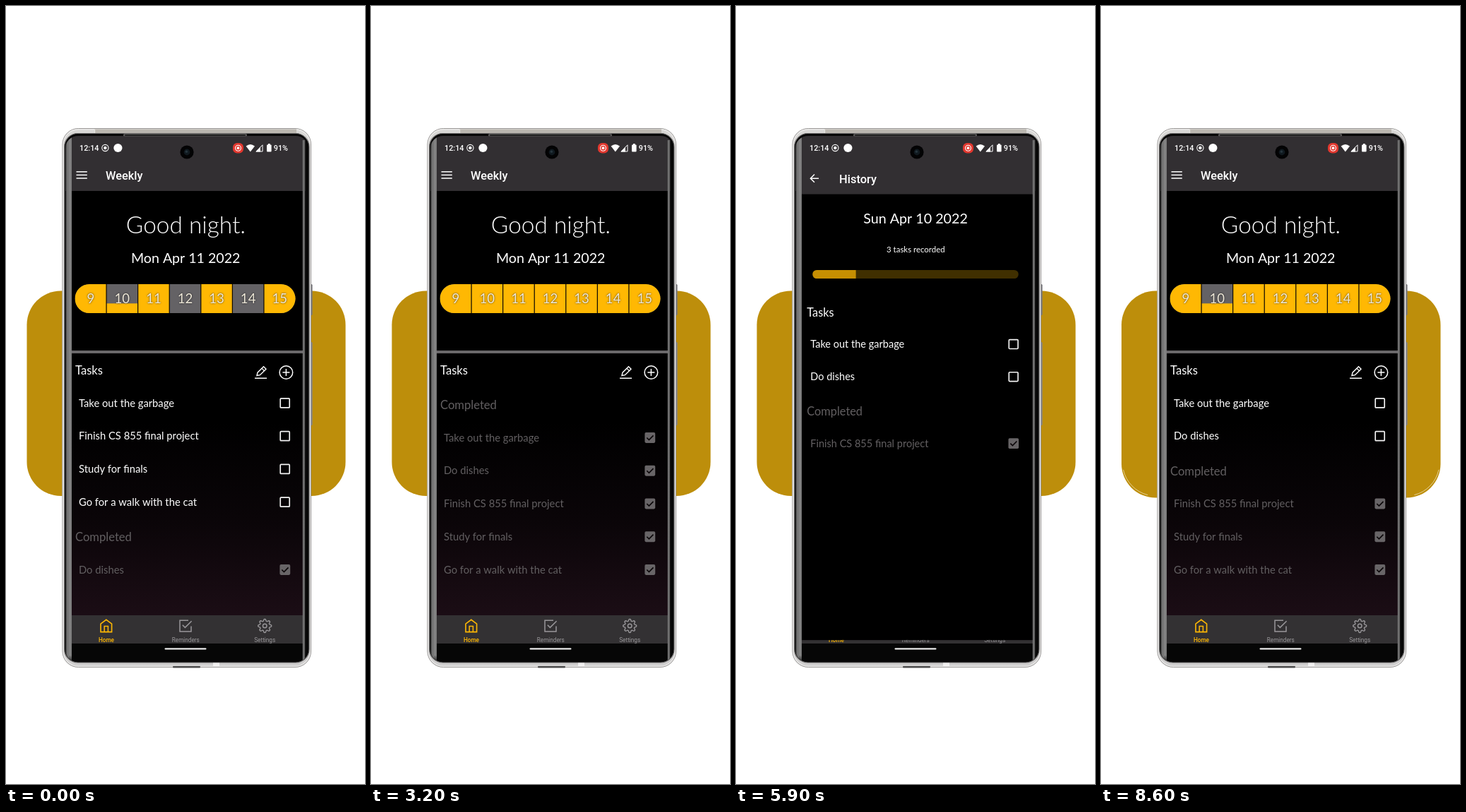
These frames come from a looping animation (508x1102 px, 9900 ms). An HTML page with a canvas:

```html
<!DOCTYPE html>
<html lang="en">
<head>
<meta charset="utf-8">
<title>Weekly tasks</title>
<style>
html, body { margin: 0; width: 100%; height: 100%; overflow: hidden; background: #fff; }
canvas { display: block; width: 100%; height: 100%; }
</style>
</head>
<body>
<canvas id="stage"></canvas>
<script>
const W = 508, H = 1102, LOOP = 9900, STEP = 100;
const GOLD = '#ffb803', GREY = '#646265', BAR = '#322f32', FADED = '#625f61';
const BODY = 'Lato, sans-serif', UI = 'Roboto, sans-serif';
const canvas = document.getElementById('stage');
const c = canvas.getContext('2d');
const dpr = window.devicePixelRatio || 1;
canvas.width = W * dpr;
canvas.height = H * dpr;

const TASKS = ['Take out the garbage', 'Do dishes', 'Finish CS 855 final project',
  'Study for finals', 'Go for a walk with the cat'];
// Moments at which a task is ticked or unticked
const TOGGLES = [[200, 4], [1100, 3], [1900, 2], [3100, 0], [4100, 0], [4900, 1]];

const clamp = v => Math.max(0, Math.min(1, v));

function rect(x, y, w, h, fill) {
  c.fillStyle = fill;
  c.fillRect(x, y, w, h);
}

function round(x, y, w, h, r, fill, stroke, lw = 1) {
  c.beginPath();
  c.roundRect(x, y, w, h, r);
  if (fill) { c.fillStyle = fill; c.fill(); }
  if (stroke) { c.strokeStyle = stroke; c.lineWidth = lw; c.stroke(); }
}

function disc(x, y, r, fill, stroke, lw = 1) {
  round(x - r, y - r, 2 * r, 2 * r, r, fill, stroke, lw);
}

function line(points, color, lw, closed) {
  c.beginPath();
  points.forEach(([x, y], i) => i ? c.lineTo(x, y) : c.moveTo(x, y));
  if (closed) c.closePath();
  c.strokeStyle = color;
  c.lineWidth = lw;
  c.stroke();
}

function poly(points, fill) {
  c.beginPath();
  points.forEach(([x, y]) => c.lineTo(x, y));
  c.fillStyle = fill;
  c.fill();
}

// y is the middle of the capitals
function text(s, x, y, size, { color = '#fff', font = BODY, weight = 400, align = 'left' } = {}) {
  c.font = `${weight} ${size}px ${font}`;
  c.textAlign = align;
  c.fillStyle = color;
  c.fillText(s, x, y + size * 0.36);
}

function gradient(x0, y0, x1, y1, colors) {
  const g = c.createLinearGradient(x0, y0, x1, y1);
  colors.forEach((color, i) => g.addColorStop(i / (colors.length - 1), color));
  return g;
}

const vertical = (y0, y1, ...colors) => gradient(0, y0, 0, y1, colors);
const horizontal = (x0, x1, ...colors) => gradient(x0, 0, x1, 0, colors);

function doneAt(t) {
  const done = [false, true, false, false, false];
  for (const [at, i] of TOGGLES) if (t >= at) done[i] = !done[i];
  return done;
}

function checkbox(y, checked) {
  if (!checked) return round(388.2, y - 6.4, 13, 13, 1, null, '#f2f2f2', 1.7);
  round(387.4, y - 7.2, 14.8, 14.8, 1.8, '#686567');
  line([[390.3, y + 0.2], [393.4, y + 3.3], [399.5, y - 3]], '#0c080a', 1.7);
}

function taskRow(name, y, checked) {
  text(name, 103, y, 14.75, { color: checked ? FADED : '#fff' });
  checkbox(y, checked);
}

function taskList(done, indexes, top, headGap) {
  const open = indexes.filter(i => !done[i]), closed = indexes.filter(i => done[i]);
  const pitch = 46.75;
  open.forEach((i, n) => taskRow(TASKS[i], top + n * pitch, false));
  const head = top + open.length * pitch + headGap;
  text('Completed', 98, head, 16.6, { color: FADED });
  closed.forEach((i, n) => taskRow(TASKS[i], head + 46 + n * pitch, true));
}

function week(done) {
  const x0 = 97.5, y0 = 394, w = 312, h = 41, cell = w / 7;
  const share = [0, 1, 2].filter(i => done[i]).length / 3;
  const fill = [1, share, 1, +done[3], 1, +done[4], 1];
  c.save();
  c.beginPath();
  c.roundRect(x0, y0, w, h, 20.5);
  c.clip();
  fill.forEach((f, i) => {
    const x = x0 + i * cell;
    rect(x, y0, cell + 0.5, h, GREY);
    rect(x, y0 + h * (1 - f), cell + 0.5, h * f, GOLD);
  });
  for (let i = 1; i < 7; i++) rect(x0 + i * cell - 0.6, y0, 1.2, h, '#0b0800');
  c.restore();
  c.save();
  c.shadowColor = 'rgba(0,0,0,.75)';
  c.shadowBlur = 2.5 * dpr;
  fill.forEach((f, i) => text(String(9 + i), x0 + (i + 0.5) * cell, 414, 18.6,
    { color: '#eee8d8', align: 'center' }));
  c.restore();
}

function listIcons() {
  line([[352, 527.3], [369, 527.3]], '#fff', 1.5);
  line([[355, 523.5], [356, 519.2], [364.5, 510.8], [368, 514.2], [359.4, 522.7]], '#fff', 1.4, true);
  line([[362, 513.4], [365.5, 516.8]], '#fff', 1.2);
  disc(396.4, 519, 9.3, null, '#fff', 1.5);
  line([[391.4, 519], [401.4, 519]], '#fff', 1.5);
  line([[396.4, 514], [396.4, 524]], '#fff', 1.5);
}

function tabs() {
  const grey = '#99979a';
  rect(89, 863, 334, 40, '#333133');
  line([[134, 875.2], [141.8, 869.3], [149.6, 875.2], [149.6, 886.6], [134, 886.6]], GOLD, 1.6, true);
  line([[139.2, 886.6], [139.2, 878.6], [144.4, 878.6], [144.4, 886.6]], GOLD, 1.5);
  line([[262, 878.5], [262, 886], [246, 886], [246, 870.2], [258, 870.2]], grey, 1.5);
  line([[249.8, 876.8], [253.4, 880.4], [262.6, 871.2]], grey, 1.5);
  const gear = [];
  for (let i = 0; i < 64; i++) {
    const a = i / 64 * 2 * Math.PI;
    const r = 8.2 + 1.3 * Math.tanh(2.2 * Math.cos(8 * a));
    gear.push([366.2 + r * Math.cos(a), 878 + r * Math.sin(a)]);
  }
  line(gear, grey, 1.4, true);
  disc(366.2, 878, 2.8, null, grey, 1.4);
  const label = (s, x, color, weight) =>
    text(s, x, 898.4, 8.2, { color, weight, font: UI, align: 'center' });
  label('Home', 142, GOLD, 500);
  label('Reminders', 254.3, grey, 400);
  label('Settings', 366.2, grey, 400);
}

function home(t) {
  const done = doneAt(t);
  rect(84, 262, 340, 641, '#000');
  rect(89, 590, 334, 273, vertical(590, 863, '#000', '#0a0508', '#1b0d15'));
  rect(84, 182, 340, 80, BAR);
  for (const y of [234.8, 239.4, 244]) rect(99.5, y - 0.75, 15.3, 1.5, '#fff');
  text('Weekly', 141, 240, 16.4, { font: UI, weight: 500 });
  text('Good night.', 254.5, 309.5, 33.4, { align: 'center', weight: 300 });
  text('Mon Apr 11 2022', 254.2, 357.4, 19.6, { align: 'center' });
  week(done);
  rect(89, 488, 334, 4, '#6a686a');
  text('Tasks', 98, 516.5, 16.6);
  listIcons();
  taskList(done, [0, 1, 2, 3, 4], 562.3, 3);
  tabs();
}

function history(t, p) {
  const age = t - 5800;
  const scale = 0.85 + 0.15 * p;
  const alpha = clamp(p / 0.75);
  c.save();
  c.globalAlpha = alpha;
  c.translate(255, 574);
  c.scale(scale, scale);
  c.translate(-255, -574);
  rect(84, 262, 340, 641, '#000');
  rect(84, 182, 340, 80, BAR);
  line([[115, 239.3], [103.4, 239.3]], '#fff', 1.5);
  line([[108.9, 233.6], [103.2, 239.3], [108.9, 245]], '#fff', 1.5);
  text('History', 144.5, 240, 16.7, { font: UI, weight: 500 });
  text('Sun Apr 10 2022', 254, 297, 20, { align: 'center' });
  text('3 tasks recorded', 254.3, 341.6, 11.6, { align: 'center' });
  const shown = (1 - Math.exp(-age / 100)) / 3;
  c.save();
  c.globalAlpha = alpha * (1 - Math.exp(-age / 83));
  c.beginPath();
  c.roundRect(106, 371, 296, 12.4, 6.2);
  c.clip();
  rect(106, 371, 296, 12.4, '#5c4300');
  rect(106, 371, 296 * shown, 12.4, GOLD);
  c.restore();
  text('Tasks', 98, 432, 16.6);
  taskList(doneAt(t), [0, 1, 2], 477.6, 3);
  c.restore();
}

function statusBar() {
  const label = (s, x) => text(s, x, 201, 10.8, { font: UI, weight: 500 });
  label('12:14', 104);
  disc(140.4, 201, 4.6, null, '#fff', 1.1);
  disc(140.4, 201, 2.2, '#fff');
  disc(158.4, 201, 6.1, '#fff');
  round(321, 194, 15, 14.6, 6, '#e2382f');
  disc(328.5, 201.2, 4, null, '#fff', 1.1);
  disc(328.5, 201.2, 1.9, '#fff');
  c.beginPath();
  c.moveTo(345.8, 206.5);
  c.lineTo(339.6, 198.6);
  c.quadraticCurveTo(345.8, 193.6, 352, 198.6);
  c.fillStyle = '#fff';
  c.fill();
  line([[354, 206], [363, 206], [363, 196.8]], '#fff', 1, true);
  poly([[353.2, 206.4], [360, 199.6], [360, 206.4]], '#fff');
  round(369, 196.4, 6.6, 10.2, 1, '#fff');
  rect(370.9, 195, 2.8, 2, '#fff');
  label('91%', 378.8);
  disc(256, 207, 9.6, '#030304');
  disc(256, 207, 4.4, '#10191f');
  disc(255.4, 206.2, 1.8, '#25343c');
}

function panel(t) {
  const color = '#bd8e0b';
  if (t < 6000) return round(29.5, 403.5, 451, 290.5, 48, color);
  round(29, 403.5, 451.5, 293, 48, color);
  c.strokeStyle = 'rgba(255,250,235,.75)';
  c.lineWidth = 0.8;
  for (const [x, from, to] of [[78, 0.58, 0.93], [431.5, 0.07, 0.42]]) {
    c.beginPath();
    c.arc(x, 646.5, 47.6, from * Math.PI, to * Math.PI);
    c.stroke();
  }
}

function shell() {
  round(430, 394, 3.6, 44, 1.5, '#77777c');
  round(430, 476, 3.6, 118, 1.5, '#85858a');
  round(79.5, 173, 352.5, 764, 23, vertical(173, 937, '#d9d8d6', '#c4c3c3', '#dcdbdb', '#cfcece'));
  round(80, 173.5, 351.5, 763, 22.5, null, '#989695', 1);
  round(81.1, 174.6, 349.3, 760.8, 21.5, null, '#efeeed', 1.2);
  rect(125, 174.5, 286, 5.5, '#bbb7b0');
  rect(125, 174.5, 1.2, 6, '#e6e4e0');
  round(82.6, 180.5, 346.4, 749.5, 19, '#060606', '#6c6b6b', 1.2);
  round(236, 935, 39, 2.4, 1, '#4a4a4a');
  rect(293, 930.5, 9, 5, '#f0efef');
}

// Light caught by the curved sides of the glass
function glare() {
  rect(84.5, 184, 4.6, 746, horizontal(84.5, 89.1, '#3c3c3c', '#787878', '#747474'));
  rect(89, 184, 4, 736, horizontal(89, 93, '#858585', '#7c7c7c'));
  rect(89, 920, 4, 10, vertical(920, 930, '#7c7c7c', '#1a1a1a'));
  rect(419.8, 190, 3.6, 740, horizontal(419.8, 423.4, '#7d7d7d', '#555'));
  rect(423.4, 184, 5, 746, '#080808');
}

function openness(t) {
  if (t < 5800) return 0;
  if (t < 8200) return 1 - Math.exp(-(t - 5800) / 43);
  const u = clamp((t - 8150) / 350);
  return 1 - u * u * (3 - 2 * u);
}

function draw(t) {
  c.setTransform(canvas.width / W, 0, 0, canvas.height / H, 0, 0);
  rect(0, 0, W, H, '#fff');
  panel(t);
  shell();
  c.save();
  c.beginPath();
  c.roundRect(84, 184, 344, 745.5, 18);
  c.clip();
  c.save();
  c.beginPath();
  c.rect(84, 182, 340, 721.5);
  c.clip();
  home(t);
  const p = openness(t);
  if (p > 0) history(t, p);
  c.restore();
  glare();
  c.restore();
  round(166, 181, 175, 3.4, 1.5, '#5a5958');
  round(168, 182, 171, 2, 1, '#222');
  statusBar();
  round(224.5, 909.5, 59, 2, 1, '#fff');
}

const start = performance.now();
function frame() {
  const t = (performance.now() - start) % LOOP;
  draw(Math.floor(t / STEP) * STEP);
  requestAnimationFrame(frame);
}
frame();
</script>
</body>
</html>
```
